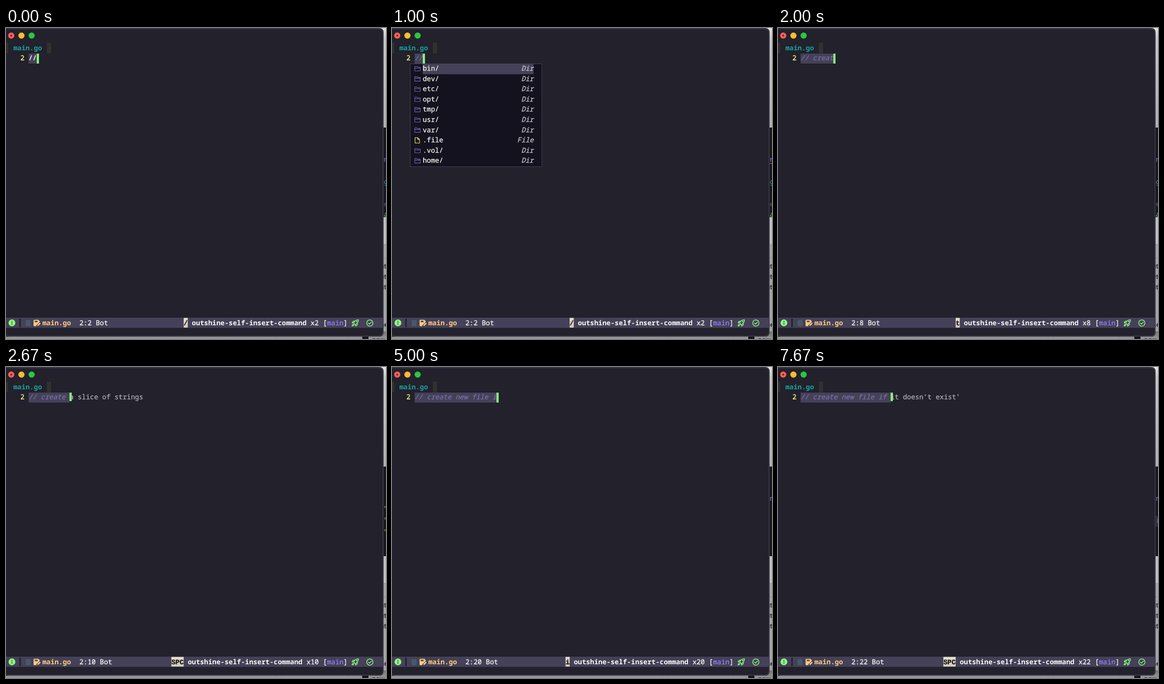
An HTML page that plays this animation: 800 by 656 pixels, repeating every 8000 ms.

```html
<!DOCTYPE html>
<html lang="en">
<head>
<meta charset="utf-8">
<title>Editor typing</title>
<style>
  html, body { margin: 0; width: 100%; height: 100%; overflow: hidden; background: #9c9c9e; }
  svg { display: block; width: 800px; height: 656px; }
  text {
    font: 500 14.37px "Noto Sans Mono", "DejaVu Sans Mono", monospace;
    color: #f8f8f2; fill: currentColor; stroke: currentColor; stroke-width: .3px;
    white-space: pre; text-rendering: geometricPrecision;
  }
  .bold { font-weight: 700; stroke: none; }
  .comment { color: #7970a9; font-style: italic; }
  .ghost { color: #b0afb3; }
  .kind { color: #c6c5c9; font-style: italic; text-anchor: end; }
  .key { font: 700 14.37px "Liberation Mono", monospace; color: #111; }
  .desk { font: 13px Inter, sans-serif; color: #1c1c1e; }
  .line { fill: none; stroke-linecap: round; stroke-linejoin: round; }
</style>
</head>
<body>
<svg viewBox="0 0 800 656" xmlns="http://www.w3.org/2000/svg">
  <defs>
    <linearGradient id="upper" x2="0" y2="1">
      <stop offset="0" stop-color="#e6e6e7"/><stop offset=".1" stop-color="#c6c6c7"/>
      <stop offset="1" stop-color="#b0b0b2"/>
    </linearGradient>
    <linearGradient id="floor" x2="0" y2="1">
      <stop offset="0" stop-color="#707072"/><stop offset="1" stop-color="#99999b"/>
    </linearGradient>
    <linearGradient id="keycap" x2="0" y2="1">
      <stop offset="0" stop-color="#e6e0cd"/><stop offset="1" stop-color="#d0cab8"/>
    </linearGradient>
  </defs>

  <!-- windows behind the editor -->
  <rect width="800" height="656" fill="#a4a4a6"/>
  <rect x="780" width="20" height="210" fill="url(#upper)"/>
  <rect x="780" y="399" width="20" height="57" fill="#bebec0"/>
  <path class="line" d="M790 456.500H800M790 485.500H800" stroke="#8c8c8e"/>
  <rect y="640" width="800" height="16" fill="url(#floor)"/>
  <path class="line" d="M568.500 650V656M580.500 650V656M719.500 650V656" stroke="#858587"/>
  <rect x="750" y="648" width="13" height="8" fill="#15151b"/>
  <text class="desk" x="771" y="662">now</text>
  <g id="desk"></g>
  <rect x="780" y="210" width="20" height="189" fill="#17171e"/>
  <g id="sliver"></g>

  <!-- editor window -->
  <path d="M0 0H785Q795 0 795 10V641Q795 651 785 651H0Z" fill="#17161d"/>
  <path d="M-2 1.500H784Q794 1.500 794 11V640Q794 650 784 650H8Q0 650 -2 644Z" fill="#22212c" stroke="#5d5966"/>
  <circle cx="11" cy="16" r="6.500" fill="#ff5f57"/>
  <circle cx="11" cy="16" r="2" fill="#8c1a10"/>
  <circle cx="32.500" cy="16" r="6.500" fill="#febc2e"/>
  <circle cx="54" cy="16" r="6.500" fill="#28c840"/>
  <path d="M0 31H4.500V53.500H0ZM86 31H95V53.500H86Z" fill="#31312f"/>
  <text class="bold" x="15.500" y="47" style="color:#17a29b">main.go</text>
  <text x="30.300" y="68" style="color:#ffff80">2</text>

  <!-- typed line -->
  <rect id="region" x="47.500" y="54" height="21" fill="#454158"/>
  <text id="typed" x="47.500" y="68"></text>
  <text id="ghost" class="ghost" y="68"></text>
  <rect id="cursor" y="54" width="4.600" fill="#8aff80"/>

  <g id="popup">
    <rect x="38.500" y="75.500" width="277" height="217" fill="#14121e" stroke="#454158"/>
    <rect x="64.500" y="76" width="233.500" height="21.500" fill="#454158"/>
  </g>

  <!-- mode line -->
  <rect y="611" width="794" height="21.500" fill="#454158"/>
  <circle cx="12.500" cy="622" r="7.200" fill="#8aff80"/>
  <path d="M12.500 617.500V626.500" stroke="#39513f" stroke-width="1.300"/>
  <rect x="28" y="613" width="3" height="18" fill="#22212c"/>
  <rect x="41.500" y="616" width="10" height="13" rx="2" fill="#45596a"/>
  <path d="M60 615.500H68L71 618.500V620L64 627L63.500 629H60Q58 629 58 627V617.500Q58 615.500 60 615.500Z" fill="#ffca80"/>
  <path d="M60.500 617.500H66.500V620.500H60.500Z" fill="#454158"/>
  <path d="M66 628.500L66.500 626L71 621.500L73 623.500L68.500 628Z" fill="#ffca80"/>
  <text class="bold" x="76.500" y="627" style="color:#ffca80">main.go</text>
  <text id="place" x="154.500" y="627"></text>
  <rect id="cap" y="611.500" height="20.500" fill="url(#keycap)"/>
  <text id="key" class="key" y="627"></text>
  <text id="command" class="bold" y="627">outshine-self-insert-command</text>
  <text id="count" y="627"></text>
  <text x="667.300" y="627">[<tspan style="color:#9580ff">main</tspan>]</text>
  <g class="line" stroke="#8aff80" stroke-width="1.500">
    <path d="M732 622Q735 615.500 742 615.500Q742 622 735.500 626ZM732 621.500L728.500 622L731 618.500H734M736 625.500V629L739.500 626.500V623.500M728.500 628.500L729.500 625.500Q731.500 624.500 732.500 626Q732.500 628 728.500 628.500"/>
    <circle cx="738.300" cy="619.300" r=".7"/>
    <circle cx="766" cy="622.300" r="6.600"/>
    <path d="M763 622.500L765.300 624.800L769.300 620.300"/>
  </g>
</svg>
<script>
  const LOOP = 8000, CELL = 8.62, LEFT = 47.5, ROW = 21.6;
  const LINE = "// create new file if ";
  // each stroke adds two characters
  const strokes = [1330, 1670, 2000, 2330, 3670, 4000, 4330, 4670, 5000, 5330];
  const hints = [
    { from: 2670, to: 3670, text: "a slice of strings" },
    { from: 6000, to: LOOP, text: "it doesn't exist'" }
  ];
  const popupSpan = { from: 330, to: 1330 };
  const $ = id => document.getElementById(id);
  const during = (t, span) => t >= span.from && t < span.to;

  function add(parent, tag, attrs, text = "") {
    const el = document.createElementNS("http://www.w3.org/2000/svg", tag);
    for (const name in attrs) el.setAttribute(name, attrs[name]);
    el.textContent = text;
    parent.append(el);
    return el;
  }

  "bin/ dev/ etc/ opt/ tmp/ usr/ var/ .file .vol/ home/".split(" ").forEach((name, i) => {
    const y = 85.5 + i * ROW, isDir = name.endsWith("/"), popup = $("popup");
    add(popup, "path", {
      class: "line", transform: `translate(47 ${y - 6})`, "stroke-width": 1.1,
      stroke: isDir ? "#7568ba" : "#ffff80",
      d: isDir ? "M1 1.500H5L6.500 3H12.500V11H1ZM1 5H12.500" : "M1.500 0.500H7L11 4.500V12H1.500ZM7 .5V4.500H11"
    });
    add(popup, "text", { x: 64.7, y: y + 4.5 }, name);
    add(popup, "text", { x: 298, y: y + 4.5, class: "kind" }, isDir ? "Dir" : "File");
  });

  [[507, "ut"], [529, "ut"], [551, "ut"], [630, "ne"]].forEach(([y, s]) =>
    add($("desk"), "text", { x: 788.5, y, class: "desk" }, s));

  // glimpses of the editor behind, each with the spans when it shows
  const glimpses = [
    [282, "n", "#7867c4", [0, 2330], [4000, LOOP]],
    [329, "g", "#2f7f8e", [0, 2330]],
    [376, "e", "#55516a", [0, 2330]],
    [398, "a", "#62b35c", [0, 2330]],
    [304, "'", "#b5ad62", [2330, 4000]],
    [328, "'", "#b5ad62", [2330, 4000]],
    [353, "'", "#b5ad62", [2330, 4000]],
    [329, "(", "#6a6385", [6330, LOOP]]
  ].map(([y, s, color, ...spans]) => {
    const g = add($("sliver"), "g", {});
    if (s === "(") add(g, "rect", { x: 795, y: 314, width: 5, height: 23, fill: "#302d3e" });
    add(g, "text", { x: s === "'" ? 793.5 : 795.5, y, style: `color:${color}` }, s);
    return { g, spans: spans.map(([from, to]) => ({ from, to })) };
  });
  const underline = add($("sliver"), "rect", { x: 795, y: 285, width: 5, height: 1.5, fill: "#b04848" });

  function show(el, on) { el.style.display = on ? "" : "none"; }
  function label(id, x, text) {
    $(id).setAttribute("x", x);
    if (text !== undefined) $(id).textContent = text;
  }

  function draw(t) {
    const n = 2 + 2 * strokes.filter(at => t >= at).length;
    const end = LEFT + n * CELL;
    const hint = hints.find(h => during(t, h));
    $("typed").textContent = LINE.slice(0, n);
    $("typed").setAttribute("class", t < popupSpan.from ? "bold" : "comment");
    $("region").setAttribute("width", n * CELL);
    $("cursor").setAttribute("x", end);
    // the cursor is shorter while it sits on hint text
    $("cursor").setAttribute("height", hint ? 18 : 21);
    label("ghost", end, hint ? hint.text : "");
    show($("popup"), during(t, popupSpan));
    show(underline, during(t, popupSpan));

    const key = LINE[n - 1] === " " ? "SPC" : LINE[n - 1];
    const count = "x" + n, countX = 658.5 - count.length * CELL;
    const commandX = countX - 29 * CELL, keyX = commandX - (key.length + 1) * CELL;
    $("place").textContent = `2:${n} Bot`;
    label("count", countX, count);
    label("command", commandX);
    label("key", keyX, key);
    $("cap").setAttribute("x", keyX);
    $("cap").setAttribute("width", key.length * CELL);
    glimpses.forEach(({ g, spans }) => show(g, spans.some(s => during(t, s))));
  }

  const start = performance.now();
  function tick() {
    draw((performance.now() - start) % LOOP);
    requestAnimationFrame(tick);
  }
  tick();
</script>
</body>
</html>
```
